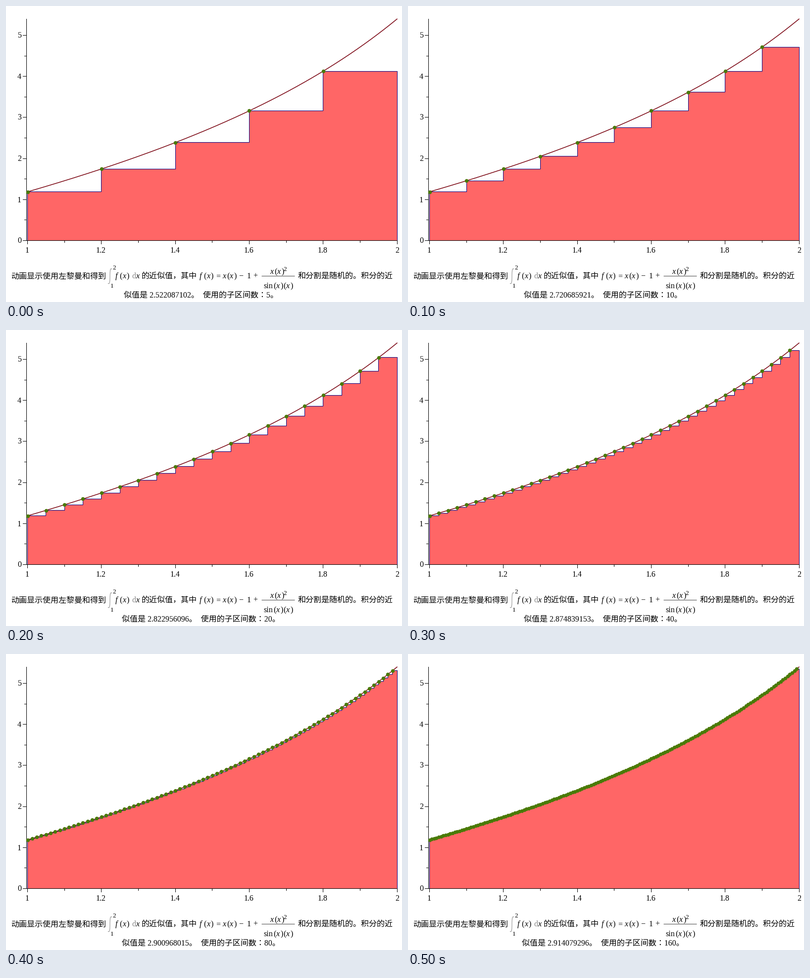
A matplotlib script for the animation above (600 ms loop, 800 by 600 pixels).

```python
import matplotlib.pyplot as plt
import numpy as np
from matplotlib.animation import FuncAnimation
from matplotlib.patches import PathPatch
from matplotlib.path import Path

WIDTH, HEIGHT, DPI = 800, 600, 100
PX = 72 / DPI  # points per pixel
X0, Y0 = 43.5, 475.5
X_SCALE, Y_SCALE = 746.5, 83.2
AXIS_X = 41.5

FILL, OUTLINE = "#ff6666", "#000080"
CURVE, DOT, GREY = "#78000e", "#4a7a08", "#888888"

# Subinterval count and its left Riemann sum
SUMS = {
    5: "2.522087102",
    10: "2.720685921",
    20: "2.822956096",
    40: "2.874839153",
    80: "2.900968015",
    160: "2.914079296",
}
STEPS = list(SUMS.items())

plt.rcParams["font.family"] = ["Liberation Serif", "Noto Sans CJK JP"]
plt.rcParams["path.snap"] = False
fig = plt.figure(figsize=(WIDTH / DPI, HEIGHT / DPI), dpi=DPI, facecolor="white")
ax = fig.add_axes([0, 0, 1, 1])
ax.set_xlim(0, WIDTH)
ax.set_ylim(HEIGHT, 0)
ax.axis("off")


def f(x):
    return x - 1 + x**2 / np.sin(x)


def to_px(x, y):
    return X0 + X_SCALE * (x - 1), Y0 - Y_SCALE * y


def crisp(x, y):
    """Pixel position moved to the centre of its pixel."""
    return tuple(np.floor(v) + 0.5 for v in to_px(x, y))


def line(xs, ys, color="black", width=1, z=5):
    return ax.plot(xs, ys, color=color, lw=width * PX, zorder=z)[0]


def label(x, y, s, size=16, **kw):
    return ax.text(x, y, s, fontsize=size * PX, va="baseline", **kw)


def call(x, y, name):
    """Set name(x) in italics with upright parentheses."""
    for dx, glyph in ((0, name), (9, "("), (14.5, "x"), (23, ")")):
        label(x + dx, y, glyph, style="normal" if glyph in "()" else "italic")


def draw_axes():
    right, top = crisp(2, f(2))
    line([AXIS_X, AXIS_X], [top, Y0])
    line([AXIS_X, right], [Y0, Y0])
    for i in range(11):
        x, y = crisp(1 + i / 10, i / 2)
        major = i % 2 == 0
        line([x, x], [Y0, Y0 + (7 if major else 4)])
        line([AXIS_X - (7 if major else 4), AXIS_X], [y, y])
        if major:
            label(x - 0.5, 500, f"{1 + i / 10:g}", ha="center")
            label(31, y + 5, str(i // 2), ha="right")


def draw_caption():
    base = 552
    label(10, base + 1, "动画显示使用左黎曼和得到")
    hook = Path(
        [(206, 562), (210, 566), (210, 555), (210, 548),
         (210, 541), (210, 529), (214, 533.5)],
        [Path.MOVETO] + [Path.CURVE4] * 6,
    )
    ax.add_patch(PathPatch(hook, fc="none", ec=GREY, lw=PX))
    label(215.5, 534, "2", 13)
    label(211, 571, "1", 13)
    call(220.5, base, "f")
    label(254, base, "d", color=GREY)
    label(262, base, "x", style="italic")
    label(274, base + 1, "的近似值，其中")

    call(390.5, base, "f")
    label(424, base, "=")
    call(437, base, "x")
    label(470, base, "−")
    label(487, base, "1")
    label(499, base, "+")
    call(533, 543, "x")
    label(560.5, 537, "2", 13)
    line([517, 583], [547.5, 547.5], "#444444")
    label(520, 572, "sin")
    for x in (540, 560):
        label(x, 572, "(")
        label(x + 5.5, 572, "x", style="italic")
        label(x + 14, 572, ")")
    label(590, base + 1, "和分割是随机的。积分的近")


draw_axes()
draw_caption()
xs = np.linspace(1, 2, 300)
line(*to_px(xs, f(xs)), CURVE, 1.5, 6)

area, = ax.fill([0, 0, 0], [0, 0, 0], fc=FILL, ec="none", zorder=2)
outline = line([], [], OUTLINE, 1, 4)
dots, = ax.plot([], [], "o", color=DOT, ms=7.5 * PX, mew=0, zorder=7, snap=False)
result = label(238, 592, "")


def update(i):
    n, total = STEPS[i]
    edges = 1 + np.arange(n + 1) / n
    heights = f(edges[:-1])
    px, py = crisp(np.repeat(edges, 2), np.r_[0, np.repeat(heights, 2), 0])
    area.set_xy(np.column_stack([px, py]))
    outline.set_data(px, py)
    dots.set_data(*to_px(edges[:-1], heights))
    result.set_text(f"似值是 {total}。  使用的子区间数：{n}。")
    result.set_x(242 - 4 * len(str(n)))
    return area, outline, dots, result


anim = FuncAnimation(fig, update, frames=len(STEPS), interval=100, repeat=True)
plt.show()
```
